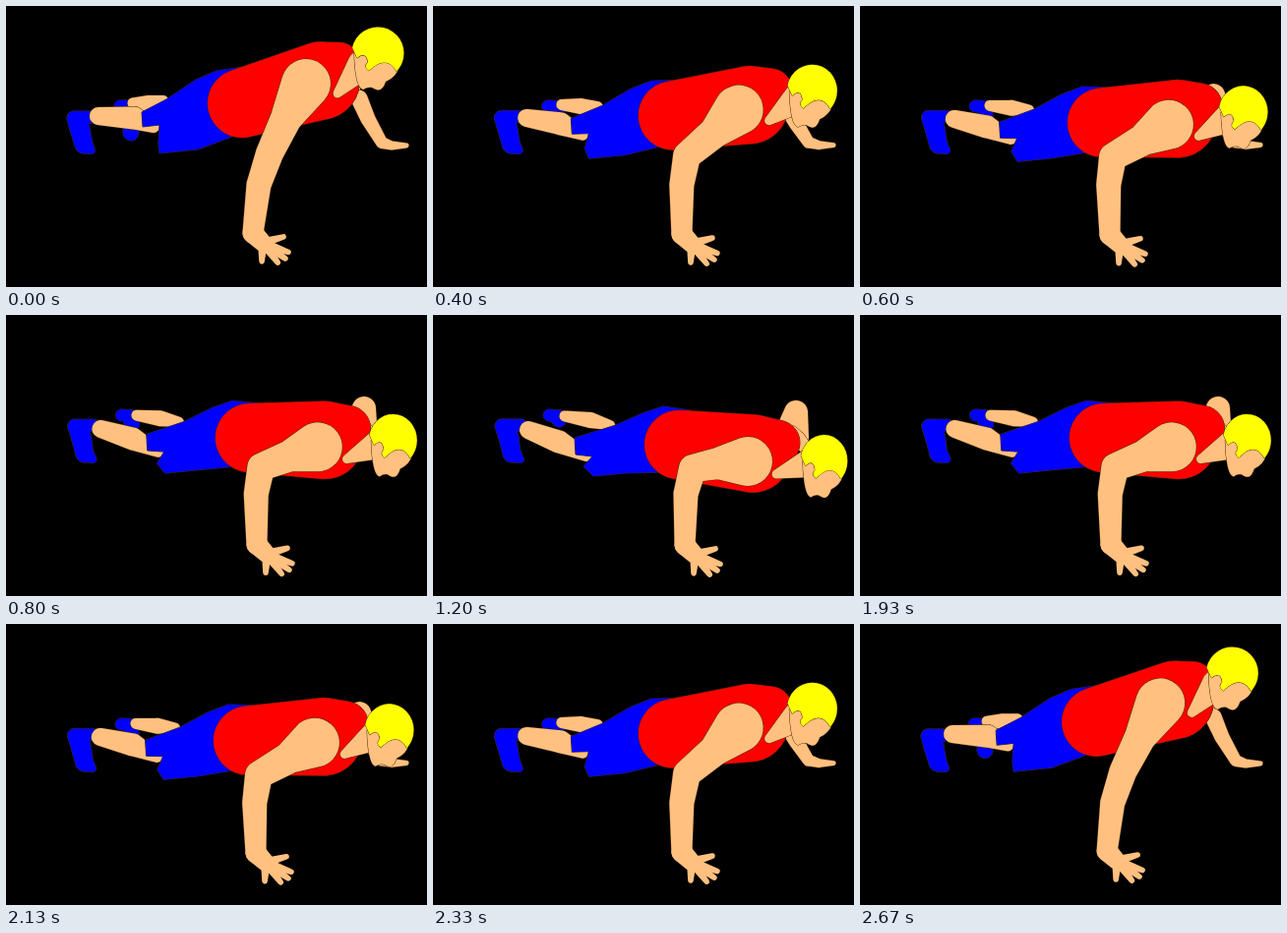
An HTML page with a canvas for the animation above (2.74 s loop, 428 px wide and 286 px high).

```html
<!DOCTYPE html>
<html lang="en">
<head>
<meta charset="utf-8">
<title>Push-up</title>
<style>
html, body { margin: 0; width: 100%; height: 100%; overflow: hidden; background: #000; }
canvas { display: block; }
</style>
</head>
<body>
<canvas id="stage" width="428" height="286"></canvas>
<script>
const ctx = document.getElementById('stage').getContext('2d');
const SKIN = '#ffc080', BLUE = '#0000ff', RED = '#ff0000', YELLOW = '#ffff00';
const LOOP = 2740, STEP = 1000 / 15, STEPS = 41;

// Depth of the push-up, 0 (arms straight) to 1, at every sixth step from step -6 on.
const DEPTHS = [0.38, 0, 0.38, 0.79, 1, 0.98, 0.73];
let depth = 0;

// Catmull-Rom curve through the depths.
function depthAt(step) {
  const k = Math.floor(step / 6), u = step / 6 - k;
  const [a, b, c, d] = DEPTHS.slice(k, k + 4);
  return b + u / 2 * (c - a + u * (2 * a - 5 * b + 4 * c - d + u * (3 * (b - c) + d - a)));
}

const mix = (high, low) => high + (low - high) * depth;

// A round joint: position with straight arms, position when lowered, radius.
const joint = (x0, y0, x1, y1, r) => ({ x: mix(x0, x1), y: mix(y0, y1), r });

function paint(color, outlined = true) {
  if (outlined) ctx.stroke();
  ctx.fillStyle = color;
  ctx.fill();
}

// Tapered body part: the hulls of each pair of neighbouring joints.
function limb(color, joints, outlined) {
  ctx.beginPath();
  for (let i = 1; i < joints.length; i++) {
    const p = joints[i - 1], q = joints[i];
    const dx = q.x - p.x, dy = q.y - p.y;
    const a = Math.atan2(dy, dx), b = Math.acos((p.r - q.r) / Math.hypot(dx, dy));
    ctx.moveTo(p.x + p.r * Math.cos(a + b), p.y + p.r * Math.sin(a + b));
    ctx.arc(p.x, p.y, p.r, a + b, a - b + 2 * Math.PI);
    ctx.arc(q.x, q.y, q.r, a - b, a + b);
    ctx.closePath();
  }
  paint(color, outlined);
}

function polygon(color, points) {
  ctx.beginPath();
  for (const { x, y } of points) ctx.lineTo(x, y);
  ctx.closePath();
  paint(color);
}

function legs() {
  limb(BLUE, [joint(116, 102, 118, 102, 6), joint(126, 102, 129, 103, 6),
    joint(127, 129, 128, 106, 8)]);
  limb(SKIN, [joint(129, 99, 134, 103, 5.5), joint(145, 99, 160, 107, 8),
    joint(160, 96, 180, 112, 5)]);
  limb(BLUE, [joint(88, 113, 90, 112, 6), joint(69, 114, 70, 113, 7),
    joint(75, 125, 77, 125, 10), joint(79, 141, 80, 141, 9), joint(87, 147, 89, 147, 3.5)]);
  limb(SKIN, [joint(94, 112, 97, 117, 9), joint(130, 114, 128, 129, 11.5),
    joint(150, 123, 156, 143, 6)]);
  polygon(BLUE, [joint(138, 108, 144, 125), joint(163, 95, 186, 112), joint(193, 75, 213, 100),
    joint(214, 66, 234, 93), joint(240, 62, 262, 97), joint(235, 131, 235, 160),
    joint(195, 146, 195, 161), joint(156, 150, 163, 164), joint(155, 140, 153, 154),
    joint(156, 121, 162, 144), joint(139, 123, 145, 142)]);
}

function farArm() {
  limb(SKIN, [joint(342, 75, 360, 112, 9), joint(345, 80, 369, 99, 12),
    joint(350, 85, 372, 125, 10)]);
  limb(SKIN, [joint(359, 94, 364, 121, 8.5), joint(368, 115, 371, 126, 7.5),
    joint(382, 139, 381, 138, 6), joint(392, 142, 392, 141, 4.5), joint(407, 142, 407, 141, 2.5)]);
}

function torso() {
  limb(RED, [joint(240, 99, 250, 132, 35), joint(320, 76, 325, 141, 39.5),
    joint(338, 60, 350, 130, 23)]);
}

function nearArm() {
  const swing = 9 * Math.sin(Math.PI * depth); // the elbow moves outwards half way
  const wrist = joint(251, 231, 256, 234, 10.5);
  limb(SKIN, [joint(305, 79, 320, 149, 25), joint(285, 114, 290, 151, 16),
    joint(268 - swing, 150, 264 - swing, 156, 14),
    joint(257 - swing / 2, 182, 257 - swing / 2, 182, 12.5), wrist]);

  const palm = joint(261, 241, 266, 244, 9);
  limb(SKIN, [wrist, palm], false);
  for (const angle of [-0.28, 0.35, 0.61, 0.92, 1.62]) {
    const reach = 29 - 9 * Math.abs(angle - 0.5);
    const at = (length, r) => ({
      x: palm.x + length * Math.cos(angle), y: palm.y + length * Math.sin(angle), r
    });
    limb(SKIN, [at(4, 4.5), at(reach, 2.8)], false);
  }
}

function head() {
  limb(SKIN, [joint(362, 60, 385, 150, 15), joint(337, 89, 349, 162, 4.5)]);
  ctx.save();
  ctx.translate(mix(378, 397.5), mix(48, 148.5));
  ctx.scale(mix(1, 0.9), 1);

  // Jaw, chin, nose and brow.
  ctx.beginPath();
  ctx.moveTo(-24, 0);
  ctx.quadraticCurveTo(-23, 35, -15, 37);
  ctx.quadraticCurveTo(-8, 33, -4, 36);
  ctx.quadraticCurveTo(4, 41, 8, 29);
  ctx.quadraticCurveTo(19, 24, 21, 15);
  ctx.lineTo(10, 0);
  paint(SKIN);

  // Crown, hairline, sideburn and ear.
  ctx.beginPath();
  ctx.arc(0, 0, 26.5, 3.35, 0.77);
  ctx.bezierCurveTo(12, 6, 2, 7, -9, 18);
  ctx.quadraticCurveTo(-15, 14, -10, 9);
  ctx.quadraticCurveTo(-12, -3, -21, 5);
  ctx.closePath();
  paint(YELLOW);
  ctx.restore();
}

function draw(now) {
  const count = Math.floor((now % LOOP + 4) / STEP) % STEPS;
  depth = depthAt(Math.min(count, STEPS - count));
  ctx.fillStyle = '#000';
  ctx.fillRect(0, 0, 428, 286);
  ctx.strokeStyle = '#402800';
  ctx.lineWidth = 1;
  ctx.lineJoin = 'round';
  legs();
  farArm();
  torso();
  nearArm();
  head();
  requestAnimationFrame(() => draw(performance.now() - start));
}

const start = performance.now();
draw(0);
</script>
</body>
</html>
```
